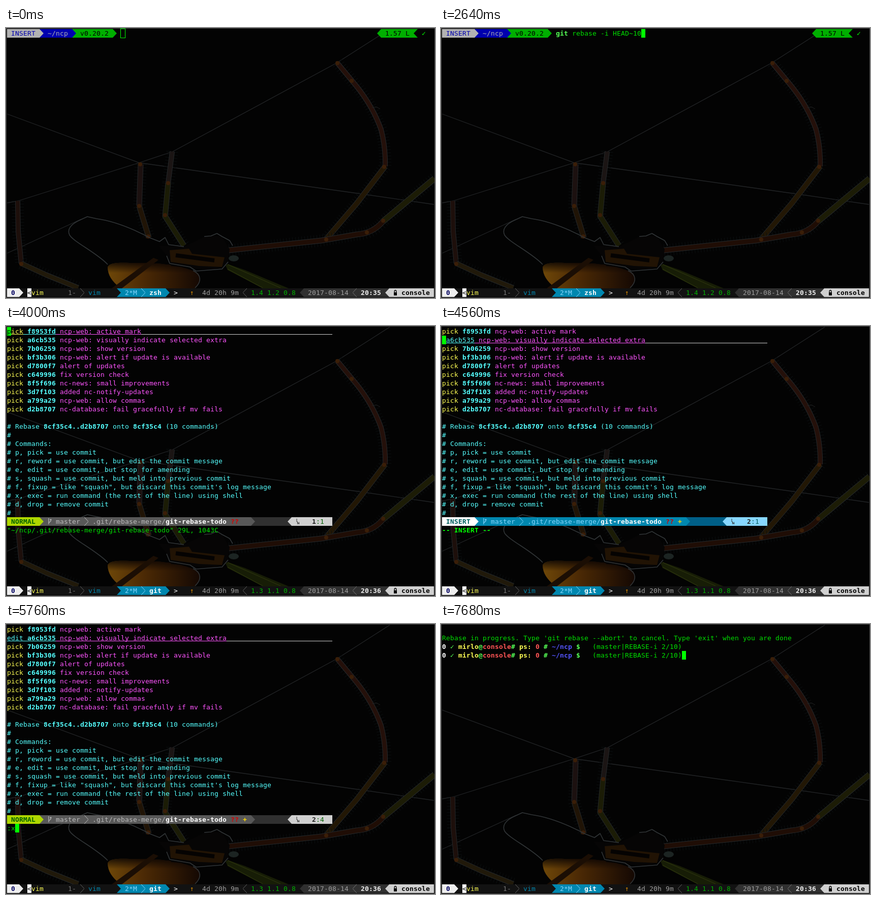
An HTML page for the animation above (8 s loop, 844 px wide and 531 px high).

```html
<!DOCTYPE html>
<html lang="en">
<head>
<meta charset="utf-8">
<title>Interactive rebase in a terminal</title>
<style>
  html, body { margin: 0; width: 100%; height: 100%; overflow: hidden; background: #030303; }
  #stage { position: relative; width: 844px; height: 531px; overflow: hidden;
    font: 13px/17px "DejaVu Sans Mono", monospace; letter-spacing: .1735px; }
  #photo, #screen { position: absolute; left: 0; top: 0; }
  #screen > * { position: absolute; height: 17px; white-space: pre; }
  .bold { font-weight: bold; }
  .line { background: linear-gradient(currentColor, currentColor) 0 14px / 100% 1px no-repeat; }
  #frame { position: absolute; inset: 0; border: 1px solid #4c4c4c; }
</style>
</head>
<body>
<div id="stage">
  <svg id="photo" width="844" height="531" fill="none" stroke-linejoin="round">
    <defs>
      <linearGradient id="amber">
        <stop offset="0" stop-color="#6e4708"/><stop offset=".4" stop-color="#4b2905"/>
        <stop offset="1" stop-color="#140803"/>
      </linearGradient>
      <linearGradient id="fade" x2="0" y2="1">
        <stop offset="0" stop-color="#080303" stop-opacity=".8"/><stop offset=".4" stop-color="#080303" stop-opacity="0"/>
      </linearGradient>
    </defs>
    <g stroke="#222426" stroke-width="1.3">
      <path d="M2 169L262 265L690 325L842 347"/>
      <path d="M2 344L24 340L262 265L328 243L650 69L755 2"/>
      <path d="M2 443L148 376"/>
    </g>
    <g id="legs"></g>
    <path d="M430 462L470 476L556 512H505L436 476Z" fill="#171d06"/>
    <path d="M434 464L540 511M436 474L505 511" stroke="#30380f"/>
    <g id="body">
      <path d="M200 470C205 459 230 462 262 462C310 462 350 468 378 482C386 493 380 505 372 512H226C210 500 200 487 200 470Z" fill="url(#amber)"/>
      <path d="M200 470C205 459 230 462 262 462C310 462 350 468 378 482C386 493 380 505 372 512H226C210 500 200 487 200 470Z" fill="url(#fade)"/>
      <path d="M208 512L290 452L300 456L228 512Z" fill="#1b0e04"/>
      <path d="M300 428L350 430L395 408L425 410L440 435L436 465L405 476L325 468L316 448Z" fill="#060505"/>
      <path d="M322 437L360 434L366 444L430 451L425 470L380 468L324 460Z" fill="#211304"/>
      <path d="M334 447L410 457" stroke="#050302" stroke-width="8"/>
    </g>
    <g stroke="#303436" stroke-width="1.6">
      <path d="M284 413C250 395 215 380 178 375L160 371L147 377C126 386 120 397 125 407C132 420 180 443 200 465"/>
      <path d="M284 413L302 420L313 412L320 426L350 430M316 448L322 463L362 470L374 478L425 474L437 460"/>
      <path d="M390 410L403 409L415 404L425 410L440 418L446 428M368 477C386 486 384 500 372 511"/>
    </g>
    <ellipse cx="448" cy="453" rx="10" ry="6" fill="#1c2422"/>
  </svg>
  <div id="screen"></div>
  <div id="frame"></div>
</div>
<script>
const GREEN = '#00e000', CURSOR = '#00ff00', YELLOW = '#ffff55', CYAN = '#55ffff',
      PINK = '#ff55ff', RED = '#ff5555', LIME = '#55ff55', BLUE = '#5555ff', WHITE = '#ffffff';
const LOOP = 8000;

// Background spider
const legs = [
  ['M652 69L690 115Q722 155 738 200Q747 235 746 272', '#24100a', 8],
  ['M746 272L690 345L630 415', '#221705', 9],
  ['M843 296L742 380', '#1c1c06', 10],
  ['M742 380Q722 404 690 406L620 418L430 438', '#1f0d05', 9],
  ['M23 340L24 400L30 463', '#1d0f0b', 8],
  ['M30 463L80 486L142 511', '#20190a', 8],
  ['M265 268L262 350', '#1c1110', 9],
  ['M262 350L281 412', '#201406', 9],
  ['M327 243L319 305', '#1b1514', 8],
  ['M319 305L313 370L350 428', '#1b1c06', 9],
];
const joints = [[652, 69], [680, 104], [744, 273], [742, 379], [710, 402], [630, 416],
  [30, 464], [264, 268], [262, 350], [280, 410], [319, 305], [313, 368]];
document.getElementById('legs').innerHTML = legs.map(([d, color, width]) =>
  `<path d="${d}" stroke="#0b0f10" stroke-width="24" stroke-dasharray="1 5"/>
   <path d="${d}" stroke="#25282a" stroke-width="${width + 2}"/>
   <path d="${d}" stroke="${color}" stroke-width="${width}"/>`).join('') +
  joints.map(([x, y]) => `<circle cx="${x}" cy="${y}" r="4" fill="#3a1e08"/>`).join('') +
  '<path d="M720 157L728 155L736 159" stroke="#222"/>';

// Terminal cells: 8 by 17 px, starting at 2,2
const at = (row, col) => `left:${2 + col * 8}px;top:${2 + row * 17}px`;
const esc = s => s.replace(/&/g, '&amp;').replace(/</g, '&lt;');
const put = (row, col, text, color = GREEN, cls = '', bg = '') =>
  `<span class="${cls}" style="${at(row, col)};color:${color};${bg && 'background-color:' + bg}">${esc(text)}</span>`;
const fill = (row, col, count, color) =>
  `<div style="${at(row, col)};width:${count * 8}px;background:${color}"></div>`;
const glyph = (row, col, inner) => `<svg width="8" height="17" style="${at(row, col)}">${inner}</svg>`;
const SHAPES = { right: 'M0 0L8 8.5L0 17', left: 'M8 0L0 8.5L8 17' };
const wedge = (row, col, dir, color) => glyph(row, col, `<path d="${SHAPES[dir]}Z" fill="${color}"/>`);
const chevron = (row, col, dir, color) =>
  glyph(row, col, `<path d="${SHAPES[dir]}" fill="none" stroke="${color}"/>`);
const cursor = (row, col, char = ' ') => put(row, col, char, '#000', '', CURSOR);

// Consecutive runs of [text, color, class] on one row
function runs(row, col, parts) {
  return parts.map(([text, color, cls]) => {
    const html = put(row, col, text, color, cls);
    col += text.length;
    return html;
  }).join('');
}

function taskbar(job, load, clock) {
  const r = 30, blue = '#0087af', dark = '#303030', pale = '#d0d0d0';
  return fill(r, 0, 105, '#121212') +
    fill(r, 0, 3, '#eeeeee') + put(r, 1, '0', '#00005f', 'bold') + wedge(r, 3, 'right', '#eeeeee') +
    put(r, 5, '<', '#000', '', WHITE) + put(r, 6, 'vim', YELLOW) +
    put(r, 15, '1-', '#767676') + chevron(r, 18, 'right', '#626262') + put(r, 20, 'vim', blue) +
    fill(r, 27, 12, blue) + wedge(r, 27, 'right', '#121212') +
    put(r, 29, '2*M', '#87d7ff') + chevron(r, 33, 'right', '#87d7ff') +
    put(r, 35, job, WHITE, 'bold') + wedge(r, 39, 'right', blue) +
    put(r, 41, '>', WHITE) + put(r, 45, '↑', '#d78700') + put(r, 48, '4d 20h 9m', '#9e9e9e') +
    chevron(r, 58, 'left', '#626262') + put(r, 60, load, '#00af00') +
    wedge(r, 72, 'left', dark) + fill(r, 73, 21, dark) + put(r, 74, '2017-08-14', '#9e9e9e') +
    chevron(r, 85, 'left', '#767676') + put(r, 87, clock, '#eeeeee', 'bold') +
    wedge(r, 93, 'left', pale) + fill(r, 94, 11, pale) +
    glyph(r, 95, '<path d="M1 8h6v6H1z"/><path d="M2.2 8V5.5a1.8 1.8 0 0 1 3.6 0V8" fill="none" stroke="#000" stroke-width="1.4"/>') +
    put(r, 97, 'console', '#000', 'bold');
}
const bars = [
  taskbar('zsh', '1.4 1.2 0.8', '20:35'),
  taskbar('git', '1.4 1.2 0.8', '20:35'),
  taskbar('git', '1.3 1.1 0.8', '20:36'),
  taskbar('git', '1.4 1.1 0.8', '20:36'),
];

function prompt(typed, load = '1.57') {
  const gray = '#b2b2b2', blue = '#0000af', green = '#00af00';
  const command = typed.slice(0, 3);
  return fill(0, 0, 8, gray) + put(0, 1, 'INSERT', blue) +
    fill(0, 8, 8, blue) + wedge(0, 8, 'right', gray) + put(0, 10, '~/ncp', gray) +
    fill(0, 16, 10, green) + wedge(0, 16, 'right', blue) + put(0, 18, 'v0.20.2', '#000') +
    wedge(0, 26, 'right', green) +
    put(0, 28, command, command === 'git' ? LIME : RED, 'bold') + put(0, 31, typed.slice(3)) +
    wedge(0, 91, 'left', green) + fill(0, 92, 9, green) + put(0, 93, load + ' L', '#000') +
    wedge(0, 100, 'left', '#030303') + put(0, 102, '✓', CURSOR);
}
const HINT = 'git clone https://github.com/nextcloud/nextcloudpi.git ncp';
function hinted(count) {
  return prompt(HINT.slice(0, count)) + put(0, 29 + count, HINT.slice(count + 1), '#585858') +
    put(0, 28 + count, HINT[count], '#111', '', '#585858');
}
const typing = text => prompt(text) + cursor(0, 28 + text.length);
const COMMAND = 'git rebase -i HEAD~10';
const waiting = prompt(COMMAND, '1.32') + cursor(1, 0);

const commits = `f8953fd ncp-web: active mark
a6cb535 ncp-web: visually indicate selected extra
7b06259 ncp-web: show version
bf3b306 ncp-web: alert if update is available
d7800f7 alert of updates
c649996 fix version check
8f5f696 nc-news: small improvements
3d7f103 added nc-notify-updates
a799a29 ncp-web: allow commas
d2b8707 nc-database: fail gracefully if mv fails`.split('\n');
const help = `#
# Commands:
# p, pick = use commit
# r, reword = use commit, but edit the commit message
# e, edit = use commit, but stop for amending
# s, squash = use commit, but meld into previous commit
# f, fixup = like "squash", but discard this commit's log message
# x, exec = run command (the rest of the line) using shell
# d, drop = remove commit
#`.split('\n');
const OPENED = put(23, 0, '"~/ncp/.git/rebase-merge/git-rebase-todo" 29L, 1043C');

function modeline(insert, changed, line, col) {
  const r = 22;
  const [mode, modeText, mid, text, rest, end, colText] = insert
    ? [WHITE, '#005f5f', '#0087af', '#87d7ff', '#005f87', '#87d7ff', '#005f5f']
    : ['#afd700', '#005f00', '#585858', '#bcbcbc', '#303030', '#d0d0d0', '#005f00'];
  return fill(r, 0, 8, mode) + put(r, 1, insert ? 'INSERT' : 'NORMAL', modeText, 'bold') +
    fill(r, 8, 52, mid) + wedge(r, 8, 'right', mode) +
    glyph(r, 10, `<path d="M2 2V14M2 11L6 8V4M4.5 5.5L6 4L7.5 5.5" fill="none" stroke="${text}" stroke-width="1.2"/>`) +
    put(r, 12, 'master', text) + chevron(r, 19, 'right', text) +
    put(r, 21, '.git/rebase-merge/', text) + put(r, 39, 'git-rebase-todo', WHITE, 'bold') +
    put(r, 55, '??', '#d70000', 'bold') + (changed ? put(r, 58, '+', '#ffd700', 'bold') : '') +
    fill(r, 60, 20, rest) + wedge(r, 60, 'right', mid) +
    wedge(r, 69, 'left', end) + fill(r, 70, 10, end) +
    glyph(r, 71, '<path d="M2 3V9H4M3.5 14V9.5L6.5 14V9.5" fill="none" stroke="#303030"/>') +
    put(r, 75, String(line), '#202020', 'bold') + put(r, 76, ':' + col, colText);
}

function editor({ line = 2, word = 'pick', insert = false, col = 1, footer = '', inText = true }) {
  let html = '';
  commits.forEach((commit, row) => {
    const current = row === line - 1, u = current ? 'line' : '';
    const verb = row === 1 ? word : 'pick';
    const known = ['pick', 'edit', 'e'].includes(verb);
    html += runs(row, 0, [
      [verb, verb === 'pick' ? YELLOW : CYAN, u],
      [' ', CYAN, u],
      [commit.slice(0, 7), CYAN, u + (known ? ' bold' : '')],
      [commit.slice(7), PINK, u],
      [current ? ' '.repeat(80 - verb.length - 1 - commit.length) : '', '#d0d0d0', u],
    ]);
  });
  html += runs(11, 0, [['# Rebase ', CYAN], ['8cf35c4..d2b8707', CYAN, 'bold'], [' onto ', CYAN],
    ['8cf35c4', CYAN, 'bold'], [' (10 commands)', CYAN]]);
  help.forEach((text, i) => html += put(12 + i, 0, text, CYAN));
  if (inText) html += cursor(line - 1, col - 1, (line === 2 ? word + ' ' : 'pick')[col - 1]);
  return html + modeline(insert, word !== 'pick', line, col) + footer;
}
const inserting = word =>
  editor({ word, insert: true, col: word.length + 1, footer: put(23, 0, '-- INSERT --', CURSOR, 'bold') });
const edited = command => editor({
  word: 'edit', col: 4, inText: !command,
  footer: command ? put(23, 0, command) + cursor(23, command.length) : '',
});

const notice = put(1, 0, "Rebase in progress. Type 'git rebase --abort' to cancel. Type 'exit' when you are done");
const shell = row => runs(row, 0, [
  ['0 ', WHITE, 'bold'], ['✓ ', LIME, 'bold'], ['mirlo', YELLOW, 'bold'], ['@', LIME, 'bold'],
  ['console', RED, 'bold'], ['# ', LIME, 'bold'], ['ps: ', YELLOW, 'bold'], ['0 ', RED, 'bold'],
  ['# ', LIME, 'bold'], ['~/ncp ', BLUE, 'bold'], ['$   ', LIME, 'bold'], ['(master|REBASE-i 2/10)', GREEN]]);

// [start in ms, taskbar, contents]
const steps = [
  [0, 0, prompt('') + `<div style="left:225px;top:1px;width:8px;height:17px;border:1px solid ${CURSOR}"></div>`],
  [880, 0, typing('')],
  [1760, 0, hinted(2)],
  [1840, 0, hinted(3)],
  [1920, 0, hinted(4)],
  [2000, 0, typing('git')],
  [2080, 0, typing('git ')],
  [2240, 0, typing('git reb')],
  [2320, 0, typing('git rebase ')],
  [2640, 0, typing(COMMAND)],
  [2960, 0, waiting],
  [3040, 1, waiting],
  [3120, 2, waiting],
  [3920, 2, OPENED],
  [4000, 2, editor({ line: 1, footer: OPENED })],
  [4320, 2, editor({ footer: OPENED })],
  [4560, 2, inserting('')],
  [4960, 2, inserting('e')],
  [5040, 2, inserting('ed')],
  [5120, 2, inserting('edi')],
  [5200, 2, inserting('edit')],
  [5520, 2, edited('')],
  [5680, 2, edited(':')],
  [5760, 2, edited(':x')],
  [5840, 2, waiting],
  [6080, 3, cursor(0, 0)],
  [6720, 3, notice + cursor(2, 0)],
  [6880, 3, notice + shell(2) + cursor(2, 59)],
  [7600, 3, notice + shell(2) + cursor(3, 0)],
  [7680, 3, notice + shell(2) + shell(3) + cursor(3, 59)],
];

const screenBox = document.getElementById('screen');
const start = performance.now();
let shown = -1;
function draw() {
  const time = (performance.now() - start) % LOOP;
  const index = steps.findLastIndex(step => step[0] <= time);
  if (index !== shown) {
    shown = index;
    const [, bar, html] = steps[index];
    screenBox.innerHTML = html + bars[bar];
  }
  requestAnimationFrame(draw);
}
draw();
</script>
</body>
</html>
```
